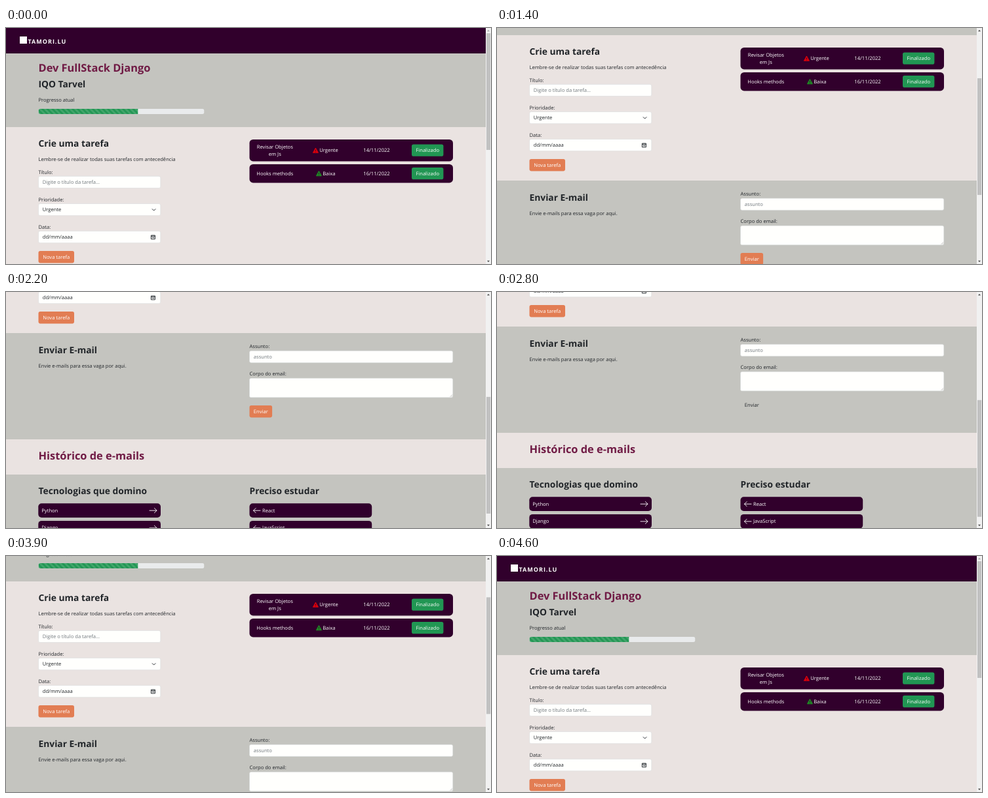
These frames come from a looping animation (740x362 px, 5100 ms). An HTML page:

```html
<!DOCTYPE html>
<html lang="pt-BR">
<head>
<meta charset="utf-8">
<title>Tarefas</title>
<style>
html, body { margin: 0; width: 100%; height: 100%; overflow: hidden; background: #eae3e1; }
svg { display: block; width: 100vw; height: 100vh; }
text { font-family: "Open Sans", "Noto Sans", sans-serif; font-size: 7.6px; fill: #212529; text-rendering: geometricPrecision; white-space: pre; }
.h1 { font-size: 16.4px; font-weight: 700; fill: #701b45; }
.h2 { font-size: 13.8px; font-weight: 700; }
.logo { font-size: 9px; font-weight: 700; letter-spacing: 1px; fill: #fff; }
.white { fill: #fff; }
.hint { fill: #70777d; }
.mid { text-anchor: middle; }
.line { fill: none; stroke: #2b3035; stroke-width: 1; stroke-linecap: round; stroke-linejoin: round; }
.arrow { fill: none; stroke: #fff; stroke-width: .9; stroke-linecap: round; stroke-linejoin: round; }
</style>
</head>
<body>
<svg id="stage" viewBox="0 0 740 362" preserveAspectRatio="none">
  <defs>
    <pattern id="stripes" x="49.5" y="124" width="7.7" height="7.7" patternUnits="userSpaceOnUse">
      <rect width="7.7" height="7.7" fill="#219653"/>
      <path d="M0 0H3.85L7.7 3.85V7.7ZM0 3.85V7.7H3.85Z" fill="#43a56c"/>
    </pattern>
    <clipPath id="barClip"><rect x="49.5" y="124" width="253" height="8" rx="3"/></clipPath>
  </defs>
  <g id="page"></g>
  <g id="scrollbar">
    <rect x="732" width="8" height="362" fill="#f1f1f1"/>
    <rect id="thumb" x="733" width="6.2" height="179" fill="#c1c1c1"/>
    <path id="up" d="M734 5.2L736 2.8L738 5.2Z"/>
    <path id="down" d="M734 356.8L736 359.2L738 356.8Z"/>
  </g>
</svg>
<script>
const LOOP = 5100, STEP = 100, MAX = 340;
const DARK = '#31002c', GRAY = '#c4c4bf', CREAM = '#eae3e1', ORANGE = '#e27d53', GREEN = '#219653';
const LEFT = 49.5, RIGHT = 371.5;

// [time in ms, scroll offset]
const scrollKeys = [
  [0, 0], [500, 0], [900, 81], [1100, 113], [1300, 113], [1800, 255], [2400, MAX],
  [2700, MAX], [2800, 322], [3300, 256], [3900, 113], [4500, 0], [LOOP, 0]
];

const $ = id => document.getElementById(id);
const rect = (x, y, w, h, fill, rx = 0, more = '') =>
  `<rect x="${x}" y="${y}" width="${w}" height="${h}" rx="${rx}" fill="${fill}" ${more}/>`;
const text = (x, y, str, cls = '') => `<text x="${x}" y="${y}" class="${cls}">${str}</text>`;
const path = (d, cls) => `<path d="${d}" class="${cls}"/>`;

const field = (x, y, w, h = 18.2) => rect(x, y, w, h, '#fffffd', 2.6, 'stroke="#d3d6d8" stroke-width=".5"');
const button = (x, y, w, label, fill, id = '') =>
  `<g id="${id}">${rect(x, y, w, 18.4, fill, 2.8)}${text(x + w / 2, y + 11.8, label, 'white mid')}</g>`;

function warning(x, y, color) {
  return `<path d="M${x + 4.5} ${y + .5}L${x + 8.5} ${y + 7.8}H${x + .5}Z" fill="${color}" stroke="${color}" stroke-linejoin="round"/>` +
    `<path d="M${x + 4.5} ${y + 3}V${y + 5.4}M${x + 4.5} ${y + 6.6}V${y + 7.3}" stroke="${DARK}" stroke-width=".9"/>`;
}

function task(y, h, lines, icon, level, levelX, date) {
  const mid = y + h / 2, base = mid + 2.6;
  const first = base - (lines.length - 1) * 5.8;
  return rect(RIGHT, y, 310.5, h, DARK, 5.5) +
    lines.map((s, i) => text(410.3, first + i * 11.6, s, 'white mid')).join('') +
    warning(levelX - 10.3, mid - 4.2, icon) +
    text(levelX, base, level, 'white') +
    text(565.5, base, date, 'white mid') +
    button(619, mid - 9.3, 48.4, 'Finalizado', GREEN);
}

function skill(x, y, label, forward) {
  const mid = y + 11;
  const arrow = forward
    ? `M219 ${mid}H230M226.4 ${mid - 3.6}L230 ${mid}L226.4 ${mid + 3.6}`
    : `M388 ${mid}H377.5M381.1 ${mid - 3.6}L377.5 ${mid}L381.1 ${mid + 3.6}`;
  return rect(x, y, 186.7, 21.8, DARK, 5) +
    text(forward ? x + 5 : x + 19.5, mid + 2.4, label, 'white') + path(arrow, 'arrow');
}

const hero =
  rect(0, 39, 732, 113, GRAY) + rect(0, 0, 732, 39, DARK) +
  rect(21, 13, 11, 11, '#fff') + text(33.5, 23.6, 'TAMORI.LU', 'logo') +
  text(LEFT, 67, 'Dev FullStack Django', 'h1') +
  text(LEFT, 91.3, 'IQO Tarvel', 'h2') +
  text(LEFT, 112.6, 'Progresso atual') +
  `<g clip-path="url(#barClip)">${rect(LEFT, 124, 253, 8, '#e9ebec')}${rect(LEFT, 124, 151.8, 8, 'url(#stripes)')}</g>`;

const tasks =
  rect(0, 152, 732, 223, CREAM) +
  text(LEFT, 182.3, 'Crie uma tarefa', 'h2') +
  text(LEFT, 204, 'Lembre-se de realizar todas suas tarefas com antecedência') +
  text(LEFT, 223.6, 'Título:') + field(LEFT, 227.4, 186.3) +
  text(55.8, 239.2, 'Digite o título da tarefa...', 'hint') +
  text(LEFT, 265.6, 'Prioridade:') + field(LEFT, 269.5, 186.3) +
  text(55.8, 281, 'Urgente') + path('M223.2 277.7L225.6 280.1L228 277.7', 'line') +
  text(LEFT, 307.7, 'Data:') + field(LEFT, 311.5, 186.3) +
  text(55.8, 323.2, 'dd/mm/aaaa') +
  path('M221.8 318H227.4V323.8H221.8ZM221.8 319.4H227.4M223.2 321.6H226', 'line') +
  button(LEFT, 342, 54.5, 'Nova tarefa', ORANGE) +
  task(171, 33.4, ['Revisar Objetos', 'em Js'], '#d8000c', 'Urgente', 478.2, '14/11/2022') +
  task(209, 28.4, ['Hooks methods'], '#1f8a24', 'Baixa', 483.2, '16/11/2022');

const mail =
  rect(0, 375, 732, 163, GRAY) +
  text(LEFT, 406, 'Enviar E-mail', 'h2') +
  text(LEFT, 428, 'Envie e-mails para essa vaga por aqui.') +
  text(RIGHT, 397.8, 'Assunto:') + field(RIGHT, 402.2, 310.3) + text(377.8, 413.6, 'assunto', 'hint') +
  text(RIGHT, 440.2, 'Corpo do email:') + field(RIGHT, 444.2, 310.3, 29.6) +
  '<path d="M677.6 472.8L681 469.4M679.6 472.8L681 471.4" stroke="#888" stroke-width=".5"/>' +
  button(RIGHT, 486, 34.6, 'Enviar', ORANGE, 'send');

const skills =
  rect(0, 538, 732, 54, CREAM) + text(LEFT, 568.8, 'Histórico de e-mails', 'h1') +
  rect(0, 592, 732, 112, GRAY) +
  text(LEFT, 622.4, 'Tecnologias que domino', 'h2') + text(RIGHT, 622.4, 'Preciso estudar', 'h2') +
  skill(49.3, 636.2, 'Python', true) + skill(49.3, 662.9, 'Django', true) +
  skill(RIGHT, 636.2, 'React', false) + skill(RIGHT, 662.9, 'JavaScript', false);

$('page').innerHTML = hero + tasks + mail + skills;
const [sendBox, sendLabel] = $('send').children;

function scrollAt(t) {
  const i = scrollKeys.findIndex(k => k[0] > t);
  const [t0, y0] = scrollKeys[i - 1], [t1, y1] = scrollKeys[i];
  return y0 + (y1 - y0) * (t - t0) / (t1 - t0);
}

function draw(time) {
  const t = Math.floor((time % LOOP) / STEP) * STEP;
  const y = Math.round(scrollAt(t));
  $('page').setAttribute('transform', `translate(0 ${-y})`);
  $('thumb').setAttribute('y', 8 + y * 0.49);
  $('up').setAttribute('fill', y > 0 ? '#505050' : '#a8a8a8');
  $('down').setAttribute('fill', y < MAX ? '#505050' : '#a8a8a8');

  // the send button loses its fill while the pointer rests on it
  const hover = y > 318;
  sendBox.setAttribute('fill', hover ? 'none' : ORANGE);
  sendLabel.setAttribute('class', hover ? 'mid' : 'white mid');
}

function tick() {
  draw(performance.now());
  requestAnimationFrame(tick);
}
tick();
</script>
</body>
</html>
```
